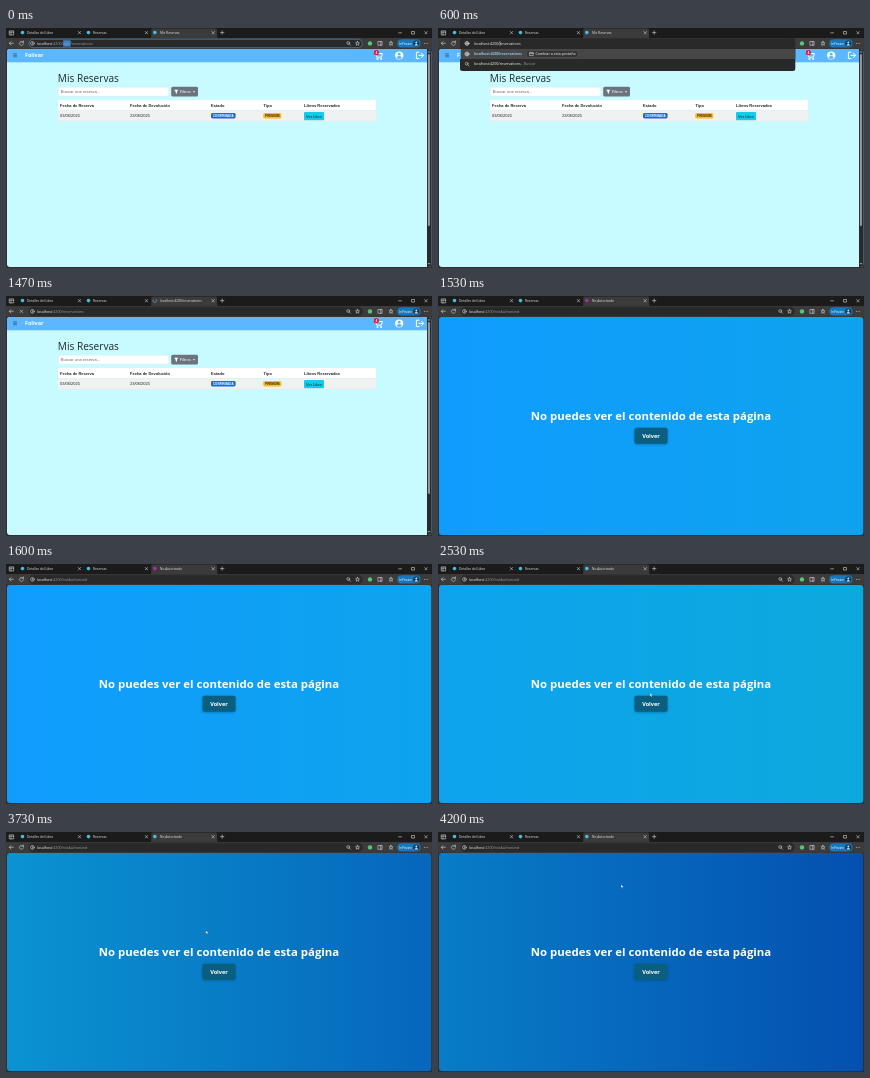
Animation, 426 px wide and 240 px high, one loop 4.27 s. Source, as an HTML page:

```html
<!DOCTYPE html>
<html lang="es">
<head>
<meta charset="utf-8">
<title>Reservas</title>
<style>
  html, body { margin: 0; width: 100%; height: 100%; overflow: hidden; background: #1b1b1b; }
  svg { display: block; width: 100vw; height: 100vh; }
  text { white-space: pre; }
  .ui { font-family: "Open Sans", "Noto Sans", sans-serif; }
  .tab { font-size: 3.25px; fill: #e6e6e6; }
  .url { font-size: 3.65px; fill: #f4f4f4; }
  .dim { fill: #9b9b9b; }
  .page { font: 4px "Liberation Sans", Arial, sans-serif; fill: #222; }
  .bold { font-weight: 700; }
  .line { fill: none; stroke: #d4d4d4; stroke-width: .6; stroke-linecap: round; }
  .white { fill: none; stroke: #fff; stroke-width: 1; stroke-linecap: round; stroke-linejoin: round; }
</style>
</head>
<body>
<svg viewBox="0 0 426 240" preserveAspectRatio="none">
  <defs>
    <linearGradient id="sea">
      <stop offset="0" stop-color="#109cff"/>
      <stop offset=".5" stop-color="#0ca9dd"/>
      <stop offset="1" stop-color="#0450b0"/>
    </linearGradient>
    <clipPath id="view"><rect x="1" y="21" width="424.3" height="218" rx="3"/></clipPath>
    <filter id="soft" x="-20%" y="-30%" width="140%" height="160%"><feGaussianBlur stdDeviation=".8"/></filter>
    <path id="cross" class="line" d="M-1.2-1.2 1.2 1.2M1.2-1.2-1.2 1.2"/>
    <g id="globe" class="line"><circle r="2"/><ellipse rx=".9" ry="2"/><path d="M-2 0H2"/></g>
    <g id="lens" class="line"><circle cx="-.3" cy="-.3" r="1.4"/><path d="M.8.8 2 2"/></g>
    <path id="star" class="line" d="M0-2 .6-.6 2-.5 1 .5 1.3 2 0 1.2-1.3 2-1 .5-2-.5-.6-.6Z"/>
  </defs>

  <rect width="426" height="240" fill="#303030"/>

  <!-- reservations page -->
  <g id="list" clip-path="url(#view)">
    <rect x="1" y="21" width="425" height="218" fill="#c8fbff"/>
    <rect x="1" y="21" width="420" height="13.3" fill="#5cb7ff"/>
    <path d="M7.2 25.8h3.8M7.2 27.3h3.8M7.2 28.8h3.8" stroke="#24435c" stroke-width=".6"/>
    <text x="19" y="29.4" class="ui bold" font-size="5.4" fill="#fff">Folivar</text>
    <g class="white">
      <path d="M367.5 24.2h1.6l1.7 5h4.5l1.1-3.7h-6.4"/>
      <circle cx="371.3" cy="31" r=".6"/><circle cx="375" cy="31" r=".6"/>
      <path d="M413 24.2h-2.6v6.4h2.6M413 27.4h4.4M415.5 25.3l2.1 2.1-2.1 2.1"/>
    </g>
    <circle cx="370.3" cy="24.6" r="2.7" fill="#e3182d"/>
    <text x="370.3" y="25.8" class="page bold" style="font-size:3.3px;fill:#fff" text-anchor="middle">4</text>
    <circle cx="393.2" cy="27.5" r="4.1" fill="#fff"/>
    <circle cx="393.2" cy="26.2" r="1.4" fill="#5cb7ff"/>
    <path d="M390.6 29.9a2.6 2 0 0 1 5.2 0q-2.6 2-5.2 0" fill="#5cb7ff"/>

    <text x="51.8" y="54.4" class="ui" font-size="10.1" fill="#20272b">Mis Reservas</text>
    <rect x="52.2" y="59.2" width="110.6" height="9" rx="1.4" fill="#fff" stroke="#d5dfe2" stroke-width=".4"/>
    <text x="54.8" y="65" class="page" style="font-size:4.15px;fill:#60666b">Buscar una reserva...</text>
    <rect x="165.2" y="58.8" width="26.8" height="9.8" rx="1.5" fill="#6b747c"/>
    <path d="M168.2 61.7h4.2l-1.5 2v2.2l-1.2-.8v-1.4zM186.8 63.2h2.4l-1.2 1.3z" fill="#fff"/>
    <text x="173.8" y="65.2" class="page" style="fill:#fff">Filtros</text>

    <rect x="52" y="72" width="318" height="10.4" fill="#fff"/>
    <rect x="52" y="82.4" width="318" height="10.8" fill="#f0f1f1"/>
    <path d="M52 82.4h318M52 93.2h318" stroke="#dce2e3" stroke-width=".3"/>
    <g id="heads" class="page bold"></g>
    <text x="54" y="88.8" class="page">03/06/2025</text>
    <text x="124" y="88.8" class="page">23/06/2025</text>
    <rect x="205" y="85" width="24.6" height="5.5" rx="1.4" fill="#176fd6"/>
    <text x="217.3" y="88.9" class="page bold" style="font-size:3.05px;fill:#fff" text-anchor="middle">CONFIRMADA</text>
    <rect x="257.2" y="85" width="18.2" height="5.5" rx="1.4" fill="#fcc016"/>
    <text x="266.3" y="88.9" class="page bold" style="font-size:3.05px" text-anchor="middle">PREMIUM</text>
    <rect x="298" y="84" width="20" height="8.2" rx="1" fill="#12cdea"/>
    <text x="308" y="89.5" class="page" text-anchor="middle">Ver Libro</text>

    <rect x="421" y="21" width="5" height="218" fill="#2a2a2a"/>
    <rect x="421.9" y="26" width="2" height="172" rx="1" fill="#9b9b9b"/>
    <path d="M421.6 24.6h2.8l-1.4-1.8zM421.6 235h2.8l-1.4 1.8z" fill="#9b9b9b"/>
  </g>

  <!-- access denied page -->
  <g id="denied" clip-path="url(#view)">
    <rect id="wash" x="1" y="21" width="1698" height="218" fill="url(#sea)"/>
    <text x="213" y="124" class="ui bold" font-size="11.4" fill="#fff" text-anchor="middle">No puedes ver el contenido de esta página</text>
    <rect x="196.5" y="132.2" width="33" height="16.2" rx="2" fill="#033a5c" opacity=".45" filter="url(#soft)"/>
    <rect x="196.5" y="131.8" width="33" height="16" rx="2" fill="#0a5f80"/>
    <text x="213" y="142" class="ui bold" font-size="5.6" fill="#fff" text-anchor="middle">Volver</text>
  </g>

  <!-- browser frame -->
  <rect width="426" height="10" fill="#1b1b1b"/>
  <rect y="10" width="426" height="10.7" fill="#3b3b3b"/>
  <path d="M144 10.2q1.3 0 1.3-1.4V2q0-1.5 1.5-1.5h62.8q1.5 0 1.5 1.5v6.800q0 1.400 1.300 1.400z" fill="#3b3b3b"/>
  <path class="line" d="M3.600 2.900h4v4h-4zM3.600 4.200h4M5 4.200v2.700"/>
  <g class="ui tab">
    <text x="21" y="5.700">Detalles del Libro</text>
    <text x="87" y="5.700">Reservas</text>
    <text id="title" x="154" y="5.700"></text>
  </g>
  <circle cx="16.500" cy="4.600" r="1.800" fill="#45bfdc"/>
  <circle cx="82.500" cy="4.600" r="1.800" fill="#45bfdc"/>
  <circle id="dot" cx="148.800" cy="4.600" r="1.800"/>
  <path id="spin" d="M0-1.800A1.800 1.800 0 1 0 1.800 0" fill="none" stroke="#6caee0" stroke-width=".6"/>
  <use href="#cross" x="73.500" y="4.700"/>
  <use href="#cross" x="140.500" y="4.700"/>
  <use href="#cross" x="207.200" y="4.700"/>
  <path class="line" d="M214.500 4.600h3.400M216.200 2.900v3.400M392.700 4.800h2.800M405.900 3.500h2.600v2.600h-2.600z"/>
  <use href="#cross" x="420" y="4.800"/>

  <path class="line" d="M7.300 15.300H3.400M5 13.600l-1.700 1.700L5 17"/>
  <path id="reload" class="line" d="M17.200 14.200A2 2 0 1 0 17.500 15.800M17.400 12.900v1.500h-1.500"/>
  <use id="stop" href="#cross" x="15.400" y="15.300"/>
  <rect id="bar" x="23" y="11.200" width="333.300" height="8.500" rx="4.200" fill="#292929" stroke-width=".6"/>
  <g id="tools">
    <use href="#lens" x="342.500" y="15.300"/>
    <use href="#star" x="351.500" y="15.300"/>
    <g class="line"><circle cx="26.400" cy="15.400" r="1.900"/><path d="M26.400 15.200v1.100M26.400 14.300v.1"/></g>
  </g>
  <circle cx="364" cy="15.400" r="2.200" fill="#55c878"/>
  <path class="line" d="M372.300 13.500h3.800v3.800h-3.800zM374.700 13.500v3.800"/>
  <use href="#star" x="385" y="15.300"/>
  <rect x="391.300" y="11.300" width="23.200" height="8.300" rx="4.100" fill="#1577bd"/>
  <text x="393.200" y="16.500" class="ui" font-size="3.100" fill="#fff">InPrivate</text>
  <circle cx="410.300" cy="15.400" r="3" fill="#183650"/>
  <circle cx="410.300" cy="14.500" r="1" fill="#d9e8f3"/>
  <path d="M408.500 17.500a1.800 1.600 0 0 1 3.600 0z" fill="#d9e8f3"/>
  <path class="line" d="M418.400 15.400h.1M420 15.400h.1M421.600 15.400h.1"/>

  <!-- address suggestions -->
  <g id="drop">
    <rect x="22" y="10.300" width="335.300" height="32.700" rx="2.500" fill="#292929"/>
    <rect x="22" y="21" width="335.300" height="10" fill="#474747"/>
    <rect x="22" y="21" width="1" height="10" fill="#5ba7df"/>
    <use href="#globe" x="29" y="15.400"/>
    <use href="#globe" x="29" y="26"/>
    <use href="#lens" x="29" y="36"/>
    <rect x="88.500" y="22.500" width="51.500" height="7" rx="2" fill="#353535" stroke="#6a6a6a" stroke-width=".3"/>
    <path class="line" d="M92 24.400h3.200v3.200H92zM92 25.400h3.200"/>
    <g class="ui url">
      <text x="35.800" y="27.300" class="bold" style="fill:#8cc8ef;font-size:3.500px">localhost:4200/reservations</text>
      <text x="97.500" y="27.300">Cambiar a esta pestaña</text>
      <text x="35.800" y="37.300">localhost:4200/reservations<tspan class="dim"> - Buscar</tspan></text>
    </g>
  </g>
  <rect id="mark" x="57.200" y="12.300" width="7.400" height="6.300" fill="#3f83cf"/>
  <text id="url" class="ui url" y="16.700"><tspan>localhost</tspan><tspan id="path"></tspan></text>
  <path id="caret" d="M62 13v5" stroke="#fff" stroke-width=".4"/>
  <path id="mouse" d="M0 0v3.400l.8-.7.6 1.300.6-.3-.6-1.200h1.100z" fill="#fff" stroke="#222" stroke-width=".2"/>
</svg>
<script>
const LOOP = 4270, EDIT = 400, DROP = 470, ENTER = 930, BLOCKED = 1530, READY = 1730;
const $ = id => document.getElementById(id);
const show = (id, on) => $(id).setAttribute("visibility", on ? "visible" : "hidden");
const put = (id, text) => { if ($(id).textContent !== text) $(id).textContent = text; };
const move = (id, x, y, turn = 0) => $(id).setAttribute("transform", `translate(${x} ${y}) rotate(${turn})`);

const heads = [[54, "Fecha de Reserva"], [124, "Fecha de Devolución"], [205, "Estado"], [257.5, "Tipo"], [298, "Libros Reservados"]];
$("heads").innerHTML = heads.map(([x, s]) => `<text x="${x}" y="78.7">${s}</text>`).join("");

// time, then values to interpolate
const slide = [[1530, 0], [1600, .05], [2530, 1], [3270, 2], [4200, 3], [4270, 3.05]];
const pointer = [[1930, 72, 22], [2530, 212, 129], [2730, 213, 134], [3600, 205, 112], [4130, 184, 57], [4200, 183, 52.5], [4270, 182, 50]];

function at(keys, t) {
  let i = 1;
  while (i < keys.length - 1 && keys[i][0] < t) i++;
  const a = keys[i - 1], b = keys[i];
  const k = Math.min(1, Math.max(0, (t - a[0]) / (b[0] - a[0])));
  return a.slice(1).map((v, n) => v + (b[n + 1] - v) * k);
}

function draw(t) {
  const editing = t >= EDIT && t < ENTER;
  const loading = t >= ENTER && t < BLOCKED;
  const denied = t >= BLOCKED;
  const open = t >= DROP && t < ENTER;

  show("list", !denied);
  show("denied", denied);
  show("drop", open);
  show("tools", !open);
  show("mark", t < EDIT);
  show("caret", editing);
  show("reload", !loading);
  show("stop", loading);
  show("spin", loading);
  show("dot", !loading);
  $("dot").setAttribute("fill", denied && t < READY ? "#a13599" : "#45bfdc");
  $("bar").setAttribute("stroke", t < ENTER ? "#4f9bd6" : "#292929");

  put("title", denied ? "No Autorizado" : loading ? "localhost:4200/reservations" : "Mis Reservas");
  put("path", denied ? ":4200/notAuthorized" : t < EDIT ? ":4200/user/reservations" : ":4200/reservations");
  $("path").setAttribute("class", editing ? "" : "dim");
  $("url").setAttribute("x", open ? 35.8 : 31);

  move("spin", 148.8, 4.6, t * .45);
  move("wash", -424.5 * at(slide, t)[0], 0);
  move("mouse", ...at(pointer, t));
  show("mouse", t >= 1930 && (t < 2730 || t >= 3600));
}

const start = performance.now();
function tick() {
  draw((performance.now() - start) % LOOP);
  requestAnimationFrame(tick);
}
tick();
</script>
</body>
</html>
```
